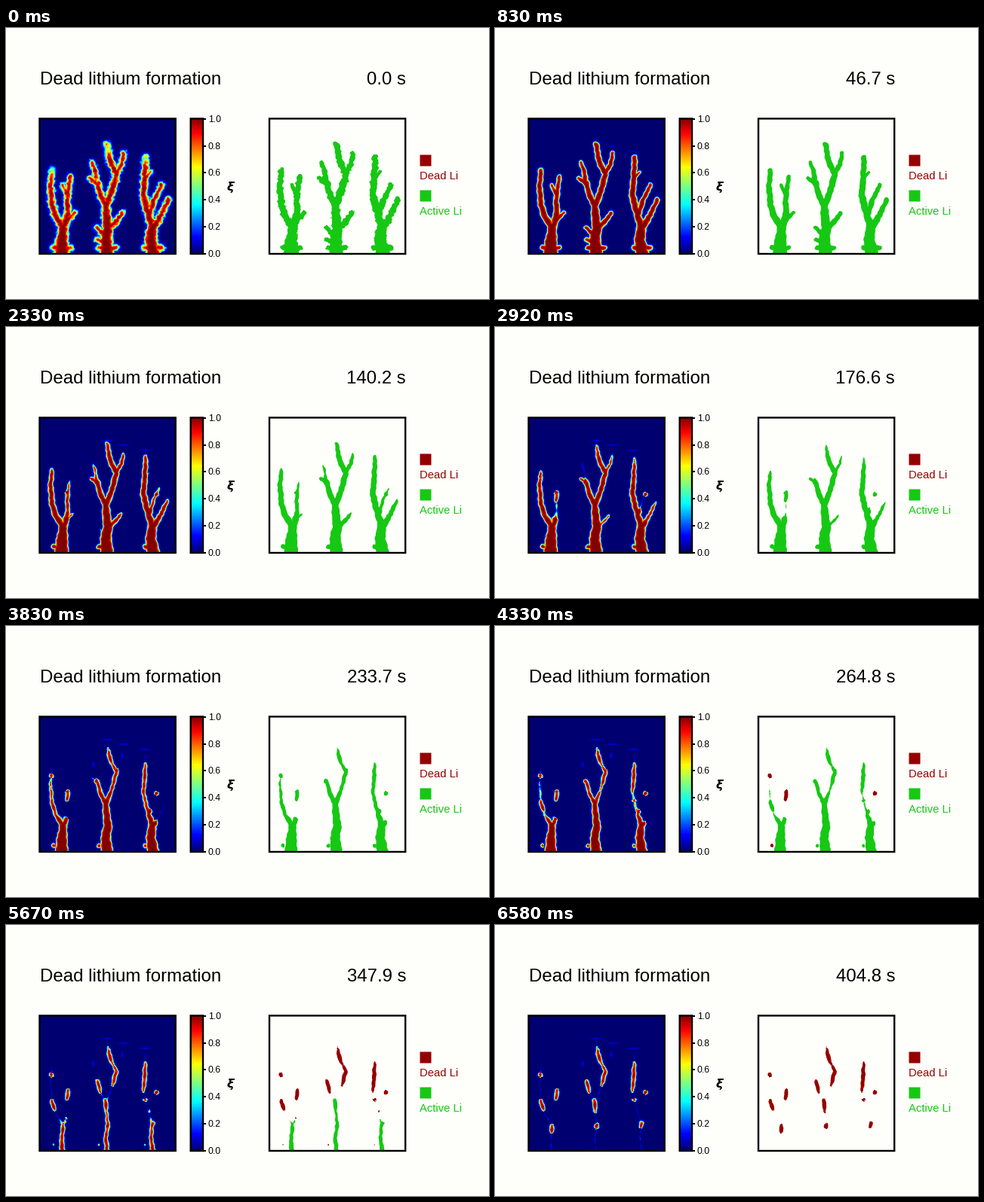
Animation, 640 px wide and 360 px high, one loop 6.66 s. Source, as a matplotlib script:

```python
import numpy as np
import matplotlib.pyplot as plt
from matplotlib.animation import FuncAnimation
from matplotlib.colors import LinearSegmentedColormap, to_rgb
from matplotlib.patches import Rectangle

W, H, DPI = 640, 360, 80
LOOP_MS, STEP_MS = 6660, 30     # the redraw grid is finer than the movie
FPS = 12                        # rate at which the picture really changes
PAPER, RED, GREEN = "#fefefa", "#940000", "#16c814"
SIZE = 180                      # panel side in pixels
LEFT, RIGHT, TOP = 45, 349, 120
LAST = 76                       # the trunks dissolve at this time
DEATH = 52                      # cut-off pieces count as dead from here on
CORE = 2.7                      # half width of the pieces left behind

JET = LinearSegmentedColormap.from_list("deep_jet", [
    (0, "#000070"), (0.12, "#0000ff"), (0.36, "#00ffff"),
    (0.64, "#ffff00"), (0.89, "#ff0000"), (1, "#800000")])

xx, yy = np.meshgrid(np.arange(SIZE) + LEFT + 0.5,
                     np.arange(SIZE) + TOP + 0.5)


class Branch:
    """A tapering limb that dissolves and may leave beads on its axis."""

    def __init__(self, points, root, tip, gone, beads=()):
        x, y = np.array(points, float).T
        run = np.r_[0, np.cumsum(np.hypot(np.diff(x), np.diff(y)))]
        along = np.linspace(0, 1, 60)
        px_, py_ = (np.interp(along, run / run[-1], c) for c in (x, y))
        far = np.hypot(xx[..., None] - px_, yy[..., None] - py_)
        s = along[far.argmin(axis=-1)]

        self.dist = far.min(axis=-1)
        self.full = root + (tip - root) * s
        # limbs last longest at the root and recede from the tip
        self.life = gone + (LAST - gone) * np.exp(-(s / 0.12) ** 2)
        if gone < LAST:
            self.life *= 1 - 0.4 * s ** 6
        # metal cut off late leaves a faint thread, the rest goes entirely
        self.rest = np.full_like(s, -1.3 if gone > 50 else -6)
        for a, b in beads:
            u = (2 * s - a - b) / (b - a)
            bead = CORE * np.sqrt(np.clip(1 - u * u, 0, 1))
            self.rest = np.where(abs(u) < 1, bead, self.rest)

    def depth(self, t):
        radius = self.full * (1 - (t / self.life) ** 5) - 0.012 * t
        return np.maximum(radius, self.rest) - self.dist


branches = [
    # left dendrite
    Branch([(74, 301), (74, 285), (76, 264)], 10, 5.8, LAST, [(0.65, 1.0)]),
    Branch([(75, 264), (66, 251), (61, 234), (59, 210), (61, 189)],
           4.8, 3.3, 57, [(0.25, 0.47), (0.83, 0.91)]),
    Branch([(78, 262), (82, 245), (81, 230), (83, 214), (85, 198)],
           4.6, 2.9, 36, [(0.45, 0.7)]),
    Branch([(80, 256), (92, 245)], 4, 2.3, 32),
    Branch([(81, 220), (75, 209)], 3.3, 2.4, 25),
    # middle dendrite
    Branch([(134, 301), (132, 282), (135, 265), (133, 248), (132, 233)],
           9, 4.6, LAST, [(0.44, 0.56), (0.75, 1.1)]),
    Branch([(131, 286), (121, 281)], 4, 2.6, 28),
    Branch([(132, 275), (120, 265)], 4, 2.6, 28),
    Branch([(136, 266), (147, 256), (154, 246)], 4.3, 2.8, 42),
    Branch([(132, 235), (125, 222), (121, 205)], 4.5, 3.7, 68, [(0.4, 1)]),
    Branch([(120, 206), (111, 200)], 3.4, 2.6, 46),
    Branch([(120, 206), (118, 190), (114, 179)], 3.8, 2.6, 34),
    Branch([(133, 235), (139, 220), (144, 203), (146, 194), (138, 177),
            (134, 155)], 4.6, 3.7, 57, [(0.26, 0.62), (0.6, 0.92)]),
    Branch([(146, 193), (153, 182), (156, 166)], 3.8, 2.6, 42),
    # right dendrite
    Branch([(195, 301), (192, 282), (194, 263)], 9, 6, LAST, [(0.8, 1.1)]),
    Branch([(193, 263), (187, 242), (182, 222), (184, 197), (185, 172)],
           5, 3.6, 57, [(0.32, 0.37), (0.45, 0.91)]),
    Branch([(184, 198), (191, 192)], 3.4, 2.2, 30),
    Branch([(190, 248), (196, 229), (206, 208)], 4, 2.8, 34, [(0.56, 0.7)]),
    Branch([(196, 264), (206, 248), (215, 228)], 4.8, 3, 45),
]
for foot in (74, 134, 195):
    branches.append(Branch([(foot - 11, 292), (foot + 11, 292)], 3.4, 3.4, 28))


def spots(points, rx, ry):
    return sum(np.exp(-((xx - x) / rx) ** 2 - ((yy - y) / ry) ** 2)
               for x, y in points)


def blur(a):
    for axis in (0, 1):
        a = (np.roll(a, 1, axis) + 2 * a + np.roll(a, -1, axis)) / 4
    return a


rng = np.random.default_rng(7)
rough = blur(blur(rng.normal(size=(SIZE, SIZE))))
rough /= rough.std()
bumps = 0.6 * (np.sin(0.5 * xx + 1.5 * np.sin(0.19 * yy))
               * np.sin(0.47 * yy + 1.2 * np.sin(0.23 * xx)))
tips = spots([(60, 188), (134, 159)], 7, 8) + spots([(184, 174)], 5, 5)
ghosts = spots([(134, 151), (156, 157), (184, 164)], 7, 1.3)
ghosts += spots([(116, 184), (154, 172)], 2, 4)


def metal_depth(t):
    """Signed distance into the metal, in pixels."""
    depth = np.max([b.depth(t) for b in branches], axis=0)
    return depth + bumps + np.exp(-t / 3) * (0.4 + 0.5 * rough)


def rooted(metal):
    """The part of the metal that is joined to the bottom edge."""
    grown = np.zeros_like(metal)
    grown[-1] = metal[-1]
    count = -1
    while grown.sum() > count:
        count = grown.sum()
        for _ in range(6):
            wide = grown.copy()
            wide[1:] |= grown[:-1]
            wide[:-1] |= grown[1:]
            wide[:, 1:] |= grown[:, :-1]
            wide[:, :-1] |= grown[:, 1:]
            grown = wide & metal
    return grown


def order_field(depth, t):
    xi = 0.5 + 0.5 * np.tanh(depth / (1.2 + 1.1 * np.exp(-t / 3)))
    xi -= 0.35 * np.exp(-t / 1.5) * tips * (1 + 0.4 * rough) * xi
    return np.clip(xi + 0.09 * min(1, t / 15) * ghosts, 0, 1)


def metal_image(depth, t):
    rgba = np.empty((SIZE, SIZE, 4))
    rgba[..., :3] = to_rgb(GREEN)
    if t >= DEATH:
        rgba[~rooted(depth > -0.5), :3] = to_rgb(RED)
    rgba[..., 3] = np.clip(depth + 0.5, 0, 1)
    return rgba


plt.rcParams["font.family"] = "Liberation Sans"
fig = plt.figure(figsize=(W / DPI, H / DPI), dpi=DPI, facecolor=PAPER)
ax = fig.add_axes((0, 0, 1, 1))
ax.set_axis_off()
px = 72 / DPI


def label(x, y, s, size, color="black", **kw):
    return ax.text(x, y, s, fontsize=size * px, color=color, **kw)


def image(data, x0, x1, y0, y1, **kw):
    return ax.imshow(data, extent=(x0, x1, y1, y0), aspect="auto",
                     interpolation="nearest", **kw)


def box(x, y, w, h, **kw):
    ax.add_patch(Rectangle((x, y), w, h, zorder=5, snap=False, **kw))


def outline(x, y, w, h):
    box(x, y, w, h, fill=False, ec="black", lw=2.4 * px)


field = image(np.zeros((SIZE, SIZE)), LEFT, LEFT + SIZE, TOP, TOP + SIZE,
              cmap=JET, vmin=0, vmax=1)
metal = image(np.zeros((SIZE, SIZE, 4)), RIGHT, RIGHT + SIZE, TOP, TOP + SIZE)
image(np.linspace(1, 0, 256)[:, None], 244.5, 261, 120.5, 299.5,
      cmap=JET, vmin=0, vmax=1)
ax.set(xlim=(0, W), ylim=(H, 0))

for left, width in ((44.5, 180.2), (349, 180.2), (244.7, 16.3)):
    outline(left, 120.4, width, 179.6)
for n in range(6):
    y = 299.5 - 35.7 * n
    ax.plot((261, 264.5), (y, y), color="black", lw=2 * px,
            solid_capstyle="butt")
    label(268, y + 4, f"{n / 5:.1f}", 12.2)
label(297.5, 216, "ξ", 16, ha="center", family="DejaVu Sans",
      weight="bold", style="oblique")

label(45.3, 75, "Dead lithium formation", 24)
clock = label(530, 75, "", 24, ha="right")
for y, name, color in ((168.5, "Dead Li", RED), (215.5, "Active Li", GREEN)):
    box(548.5, y, 15, 15, fc=color, ec="none")
    label(547.5, y + 32.5, name, 14.8, color)


def update(i):
    # each picture appears no later than its turn on the coarser clock
    t = int((i * STEP_MS + STEP_MS - 5) * FPS / 1000)
    if t != update.shown:
        depth = metal_depth(t)
        field.set_data(order_field(depth, t))
        metal.set_data(metal_image(depth, t))
        clock.set_text(f"{np.clip(5.193 * (t - 1), 0, 404.8):.1f} s")
        update.shown = t
    return field, metal, clock


update.shown = None
anim = FuncAnimation(fig, update, frames=LOOP_MS // STEP_MS, interval=STEP_MS,
                     repeat=True, repeat_delay=0, blit=False)
plt.show()
```
